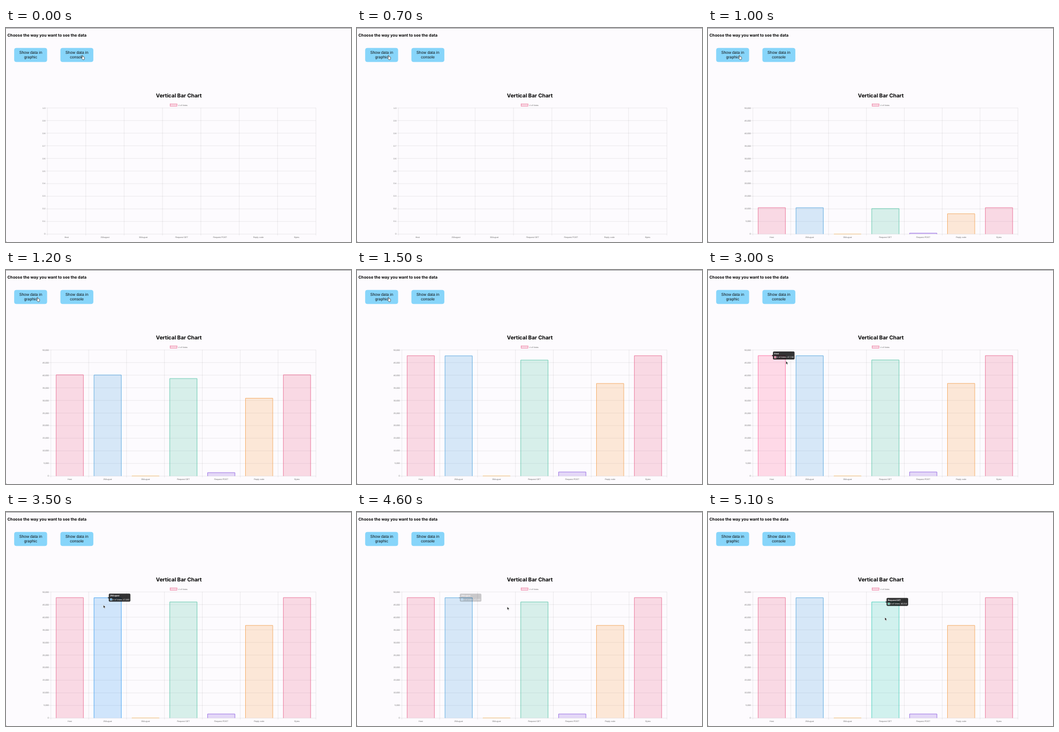
These frames come from a looping animation (600 px wide and 373 px high, 5.3 s). An HTML page:

```html
<!DOCTYPE html>
<html lang="en">
<head>
<meta charset="utf-8">
<title>Vertical Bar Chart</title>
<style>
  html, body { margin: 0; width: 100%; height: 100%; overflow: hidden; background: #fdfbfe; }
  svg { display: block; width: 100vw; height: 100vh; }
  text { font-family: "Liberation Sans", Arial, sans-serif; font-size: 3.6px; fill: #666; text-rendering: geometricPrecision; }
  .heading { font-family: Inter, sans-serif; font-weight: 700; fill: #000; }
  .button text { font-size: 6.9px; fill: #111; text-anchor: middle; }
  .tip text { fill: #fff; }
  .grid { stroke: #000; stroke-opacity: .1; stroke-width: .7; fill: none; }
</style>
</head>
<body>
<svg id="stage" viewBox="0 0 600 373"></svg>
<script>
const LOOP = 5300, STEP = 100;
const TOP = 139.3, BOTTOM = 359.2, RIGHT = 539, MAX = 50000;
const LOAD = 1000, SLIDE = 300, FADE = 200;
const bars = [
  { label: 'Host', value: 47748, color: '#e8608a', hover: '#ff5f98' },
  { label: '29August', value: 47685, color: '#4a9fdd', hover: '#2f98f0' },
  { label: '30August', value: 62, color: '#f3b960' },
  { label: 'Request GET', value: 46014, color: '#50c3a5', hover: '#33ccb4' },
  { label: 'Request POST', value: 1630, color: '#8a5ae0' },
  { label: 'Reply code', value: 36720, color: '#f3a050' },
  { label: 'Bytes', value: 47748, color: '#e8608a' }
];
// When the pointer enters a bar (index) or leaves all bars (-1).
const hovers = [[2066, 0], [3250, 1], [4450, -1], [4720, 3]];
// Pointer tip: time, x, y.
const path = [
  [0, 132, 47.5], [650, 54, 47.5], [1500, 54, 47.5], [2100, 105.3, 155.5],
  [2600, 105.3, 155.5], [3200, 146, 160], [3500, 169.3, 162], [3900, 169.3, 162],
  [4400, 198, 164], [4600, 261.2, 165], [4720, 287, 171], [5000, 307.5, 183.5]
];

const clamp = v => Math.max(0, Math.min(1, v));
const mix = (a, b, u) => a + (b - a) * u;
const smooth = u => u * u * (3 - 2 * u);
const outQuart = u => 1 - (1 - clamp(u)) ** 4;

function make(parent, name, attrs = {}, content) {
  const node = document.createElementNS('http://www.w3.org/2000/svg', name);
  set(node, attrs);
  if (content !== undefined) node.textContent = content;
  return parent.appendChild(node);
}
function set(node, attrs) {
  for (const key in attrs) node.setAttribute(key, attrs[key]);
}
const label = (parent, x, y, content, attrs = {}) => make(parent, 'text', { x, y, ...attrs }, content);
const box = (parent, x, y, width, height, attrs) => make(parent, 'rect', { x, y, width, height, ...attrs });

const stage = document.getElementById('stage');
box(stage, 0, 0, 600, 373, { fill: '#fdfbfe' });
box(stage, 0, 0, 600, .8, { fill: '#858487' });
make(stage, 'path', { d: 'M0 371.5Q0 373 1.5 373H0Z', fill: '#333' });
label(stage, 2.5, 14.6, 'Choose the way you want to see the data', { class: 'heading', 'font-size': 7, style: 'font-size:6.9px' });
label(stage, 300.6, 121.2, 'Vertical Bar Chart', { class: 'heading', style: 'font-size:9.2px', 'text-anchor': 'middle' });
button(14.2, 'graphic');
button(94.6, 'console');
box(stage, 285.3, 132.2, 12.4, 4, { fill: bars[0].color, 'fill-opacity': .22, stroke: bars[0].color, 'stroke-width': .6 });
label(stage, 299.7, 135.5, '# of Votes');

function button(x, word) {
  const g = make(stage, 'g', { class: 'button' });
  box(g, x, 34.8, 57.3, 24.5, { rx: 4, fill: '#87d5fa' });
  label(g, x + 28.6, 45.3, 'Show data in');
  label(g, x + 28.6, 53.3, word);
}

function axes(left, tickText) {
  const g = make(stage, 'g');
  const column = (RIGHT - left) / bars.length;
  let d = '';
  for (let i = 0; i <= 10; i++) {
    const y = mix(BOTTOM, TOP, i / 10);
    d += `M${left - 2.4} ${y}H${RIGHT}`;
    label(g, left - 3.5, y + 1.25, tickText(i), { 'text-anchor': 'end' });
  }
  for (let i = 0; i <= bars.length; i++) d += `M${left + i * column} ${TOP}V${BOTTOM + 2.4}`;
  make(g, 'path', { d, class: 'grid' });
  bars.forEach((bar, i) => label(g, left + (i + .5) * column, 366, bar.label, { 'text-anchor': 'middle' }));
  return g;
}

const emptyAxes = axes(72, i => i === 0 ? '0' : (i / 10).toFixed(1));
const fullAxes = axes(78, i => (i * MAX / 10).toLocaleString('en-US'));
const column = (RIGHT - 78) / bars.length;
const barWidth = column * .72;
const heightOf = value => value / MAX * (BOTTOM - TOP);
bars.forEach((bar, i) => {
  bar.x = 78 + (i + .5) * column;
  bar.node = make(fullAxes, 'path', { 'fill-opacity': .22, 'stroke-width': .75 });
});

const tip = make(stage, 'g', { class: 'tip' });
make(tip, 'path', { d: 'M0 0L2 -1.6V1.6Z', fill: '#000', 'fill-opacity': .8 });
box(tip, 2, -7.2, 37.6, 14, { rx: 1.8, fill: '#000', 'fill-opacity': .8 });
const tipTitle = label(tip, 4.2, -2, '', { 'font-weight': 700 });
const swatch = box(tip, 4.4, 1.4, 3.2, 3.2, { stroke: '#fff', 'stroke-width': .5 });
const tipBody = label(tip, 8.8, 4.2, '');

const outline = { fill: '#111', stroke: '#fff', 'stroke-width': .6, 'stroke-linejoin': 'round' };
const arrow = make(stage, 'path', { d: 'M0 0V5.5L1.3 4.4L2.2 6.3L3.1 5.9L2.3 4H4Z', ...outline });
const hand = make(stage, 'path', {
  d: 'M0 .4Q.6 -.4 1.1 .4L1.6 2.5Q2.3 2 2.6 2.7Q3.2 2.3 3.5 3Q4.3 2.7 4.4 3.6L4.5 5.4L3.8 7.6H1.3L-.8 4.7Q-.6 3.9 .5 4.6Z',
  ...outline, fill: '#fff', stroke: '#222'
});

function pointerAt(t) {
  const i = path.findIndex(key => key[0] > t);
  if (i < 0) return path[path.length - 1].slice(1);
  const [t0, x0, y0] = path[i - 1], [t1, x1, y1] = path[i];
  const u = smooth((t - t0) / (t1 - t0));
  return [mix(x0, x1, u), mix(y0, y1, u)];
}

// Replays the hover events so that position and opacity depend on time alone.
function tooltipAt(t) {
  const state = { active: -1, shown: 0, x: bars[0].x, y: BOTTOM - heightOf(bars[0].value), opacity: 0 };
  hovers.forEach(([start, index], n) => {
    if (t < start) return;
    const end = Math.min(t, n + 1 < hovers.length ? hovers[n + 1][0] : LOOP);
    const change = (end - start) / FADE;
    state.active = index;
    state.opacity = clamp(state.opacity + (index < 0 ? -change : change));
    if (index < 0) return;
    const u = outQuart((end - start) / SLIDE);
    state.shown = index;
    state.x = mix(state.x, bars[index].x, u);
    state.y = mix(state.y, BOTTOM - heightOf(bars[index].value), u);
  });
  return state;
}

function draw(now) {
  const t = Math.floor(now % LOOP / STEP) * STEP;
  const loaded = t >= LOAD;
  set(emptyAxes, { visibility: loaded ? 'hidden' : 'visible' });
  set(fullAxes, { visibility: loaded ? 'visible' : 'hidden' });

  const state = tooltipAt(t);
  const growth = outQuart(.06 + (t - LOAD) / 650);
  bars.forEach((bar, i) => {
    const color = i === state.active ? bar.hover : bar.color;
    const x = bar.x - barWidth / 2;
    const y = BOTTOM - heightOf(bar.value) * growth;
    set(bar.node, { d: `M${x} ${BOTTOM}V${y}H${x + barWidth}V${BOTTOM}`, fill: color, stroke: color });
  });

  const shown = bars[state.shown];
  set(tip, { transform: `translate(${state.x} ${state.y})`, opacity: state.opacity });
  tipTitle.textContent = shown.label;
  tipBody.textContent = '# of Votes: ' + shown.value.toLocaleString('en-US');
  set(swatch, { fill: shown.color });

  const [x, y] = pointerAt(t);
  const overButton = y < 59 && (x < 71.5 || x > 94.6);
  set(hand, { visibility: overButton ? 'visible' : 'hidden', transform: `translate(${x} ${y})` });
  set(arrow, { visibility: overButton ? 'hidden' : 'visible', transform: `translate(${x} ${y})` });
}

const begin = performance.now();
function tick() {
  draw(performance.now() - begin);
  requestAnimationFrame(tick);
}
tick();
</script>
</body>
</html>
```
